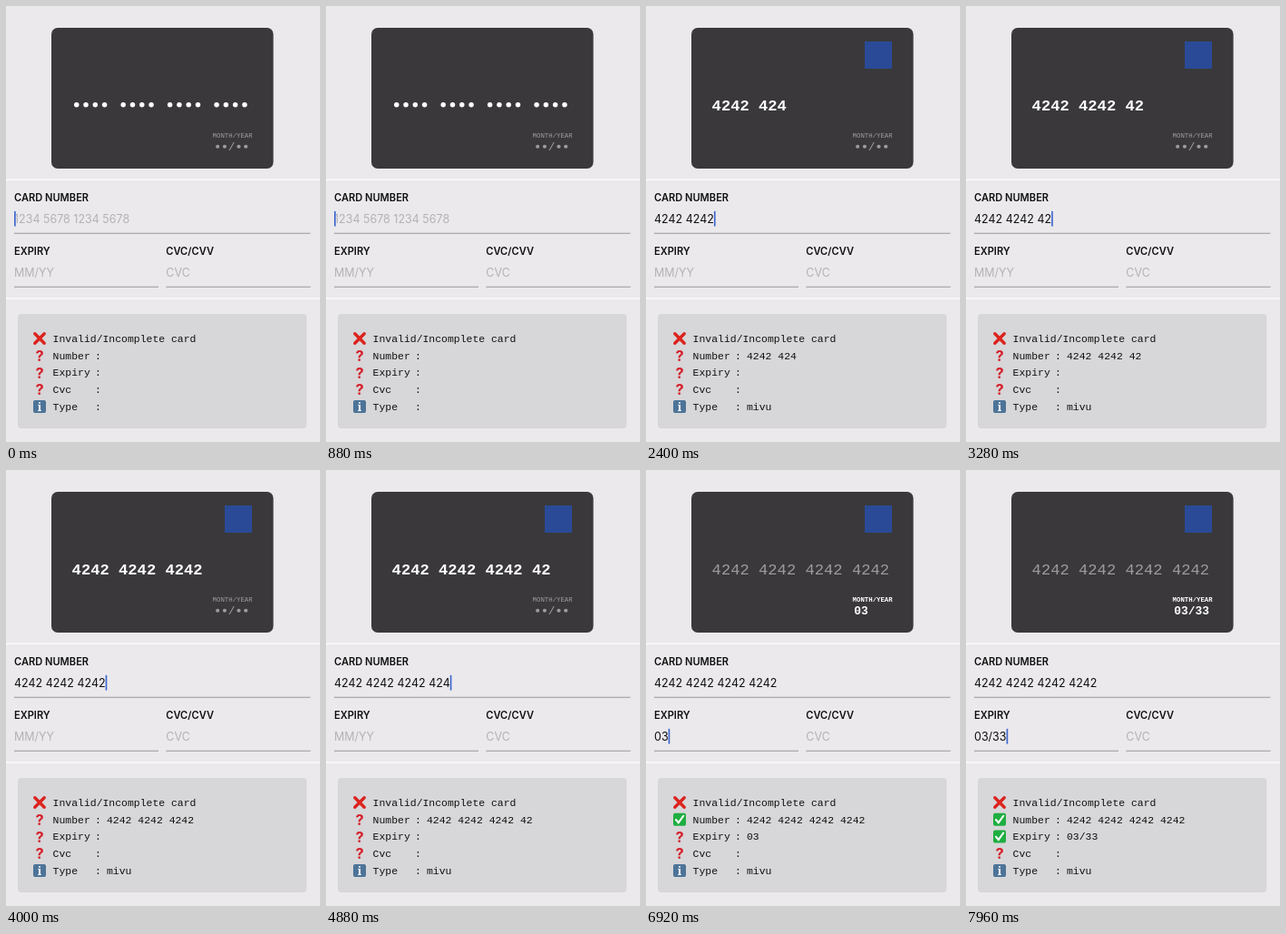
Write an HTML page with a canvas that moves like this. It is 346 px wide and 480 px high and loops after 8000 ms.

```html
<!DOCTYPE html>
<html lang="en">
<head>
<meta charset="utf-8">
<title>Card form</title>
<style>
  html, body { margin: 0; width: 100%; height: 100%; overflow: hidden; background: #ebe9ec; }
  canvas { display: block; width: 346px; height: 480px; }
</style>
</head>
<body>
<canvas id="stage"></canvas>
<script>
const W = 346, H = 480, LOOP = 8000;
const LAG = 60;        // card and panel follow the input
const FOCUS = 5280;    // focus jumps to the expiry field
const BLINK_START = -560;
const SANS = 'Inter, "Open Sans", sans-serif';
const MONO = '"Liberation Mono", "Courier New", monospace';
const DIM = 'rgba(255,255,255,.5)';

const numberKeys = [900, 1180, 1420, 1640, 1880, 2060, 2220, 2380,
                    2760, 3100, 3440, 3780, 4160, 4520, 4880, 5220];
const expiryKeys = [6300, 6640, 7300, 7840];

const stage = document.getElementById('stage');
const dpr = window.devicePixelRatio || 1;
stage.width = W * dpr;
stage.height = H * dpr;
const c = stage.getContext('2d');
c.scale(dpr, dpr);

const pressed = (keys, t) => keys.filter(k => k <= t).length;
const numberAt = t => '42'.repeat(8).slice(0, pressed(numberKeys, t)).replace(/(.{4})(?=.)/g, '$1 ');
const expiryAt = t => '0333'.slice(0, pressed(expiryKeys, t)).replace(/^(..)(?=.)/, '$1/');

function text(s, x, y, size, color, weight = 400, family = SANS, align = 'left') {
  c.font = `${weight} ${size}px ${family}`;
  c.fillStyle = color;
  c.textAlign = align;
  c.fillText(s, x, y);
  return c.measureText(s).width;
}

function box(x, y, w, h, r, color) {
  c.fillStyle = color;
  c.beginPath();
  c.roundRect(x, y, w, h, r);
  c.fill();
}

function stroke(points, width, color, cap = 'butt') {
  c.strokeStyle = color;
  c.lineWidth = width;
  c.lineCap = cap;
  c.beginPath();
  points.forEach(([x, y], i) => i ? c.lineTo(x, y) : c.moveTo(x, y));
  c.stroke();
}

// Monospaced card text whose bullets are round dots
function cardText(s, x, y, size, active) {
  const color = active ? '#fff' : DIM, step = size * 0.6;
  text(s.replace(/•/g, ' '), x, y, size, color, active ? 700 : 400, MONO);
  [...s].forEach((ch, i) => {
    if (ch !== '•') return;
    c.beginPath();
    c.arc(x + step * (i + 0.5), y - size * 0.36, size * 0.16, 0, 7);
    c.fill();
  });
}

function caretAlpha(t) {
  const last = Math.max(BLINK_START, ...[...numberKeys, FOCUS, ...expiryKeys].filter(k => k <= t));
  const p = (t - last) % 1160;
  if (p < 590) return 1;
  if (p < 650) return 1 - (p - 590) / 60;
  if (p < 1000) return 0;
  return (p - 1000) / 160;
}

function field(label, value, hint, x, y, width, focused, t) {
  text(label, x, y, 11.1, '#111', 600);
  const w = text(value || hint, x, y + 23.5, 12.5, value ? '#111' : '#b4b2b5');
  box(x, y + 34.7, width, 1, 0, '#99979a');
  if (!focused) return;
  c.globalAlpha = caretAlpha(t);
  box(x + (value ? w : 0), y + 10.8, 1.7, 17, 0.8, '#4169cf');
  c.globalAlpha = 1;
}

const icons = {
  cross(y) {
    stroke([[31.8, y - 5.2], [42.2, y + 5.2]], 3.4, '#dc2420', 'round');
    stroke([[42.2, y - 5.2], [31.8, y + 5.2]], 3.4, '#dc2420', 'round');
  },
  ask(y) {
    text('?', 37, y + 6, 16.5, '#d5202a', 700, SANS, 'center');
  },
  check(y) {
    box(30, y - 7, 14, 14, 2, '#1fae40');
    stroke([[33, y + 0.3], [35.8, y + 3.5], [41.2, y - 4]], 2.1, '#fff', 'round');
  },
  info(y) {
    box(30, y - 7, 14, 14, 2, '#4d7397');
    text('i', 37, y + 4.6, 13, '#fff', 700, '"Noto Serif", serif', 'center');
  }
};

function row(i, icon, label, value) {
  const y = 366 + i * 18.75;
  icons[icon](y);
  const mono = (s, x) => text(s, x, y + 3.8, 11.45, '#111', 400, MONO);
  mono(label, 51.6);
  if (i) mono(':', 98);
  if (value) mono(value, 111);
}

function draw(t) {
  const number = numberAt(t - LAG), expiry = expiryAt(t - LAG);
  const onExpiry = t >= FOCUS;

  box(0, 0, W, H, 0, '#ebe9ec');
  box(50, 24, 244.6, 155, 7, '#3a383b');
  if (number) box(241, 39, 30, 30, 0, '#2a4a97');
  cardText(number || '•••• •••• •••• ••••', 72.6, 115, 17.15, !onExpiry);
  text('MONTH/YEAR', 227.6, 144.6, 7.35, onExpiry ? '#fff' : DIM, onExpiry ? 700 : 400, MONO);
  cardText(expiry || '••/••', 229.3, 159.4, 12.95, onExpiry);

  box(0, 190.6, W, 1.4, 0, '#fbfafb');
  box(0, 321.3, W, 1.4, 0, '#fbfafb');
  field('CARD NUMBER', numberAt(t), '1234 5678 1234 5678', 9, 215, 326.5, !onExpiry, t);
  field('EXPIRY', expiryAt(t), 'MM/YY', 9, 274, 159, onExpiry, t);
  field('CVC/CVV', '', 'CVC', 176.3, 274, 159.2, false, t);

  box(13, 339, 318.3, 126, 4, '#d7d6d8');
  row(0, 'cross', 'Invalid/Incomplete card');
  row(1, number.length === 19 ? 'check' : 'ask', 'Number', number);
  row(2, expiry.length === 5 ? 'check' : 'ask', 'Expiry', expiry);
  row(3, 'ask', 'Cvc');
  row(4, 'info', 'Type', number && 'mivu');
}

const start = performance.now();
function tick() {
  draw((performance.now() - start) % LOOP);
  requestAnimationFrame(tick);
}
tick();
</script>
</body>
</html>
```
